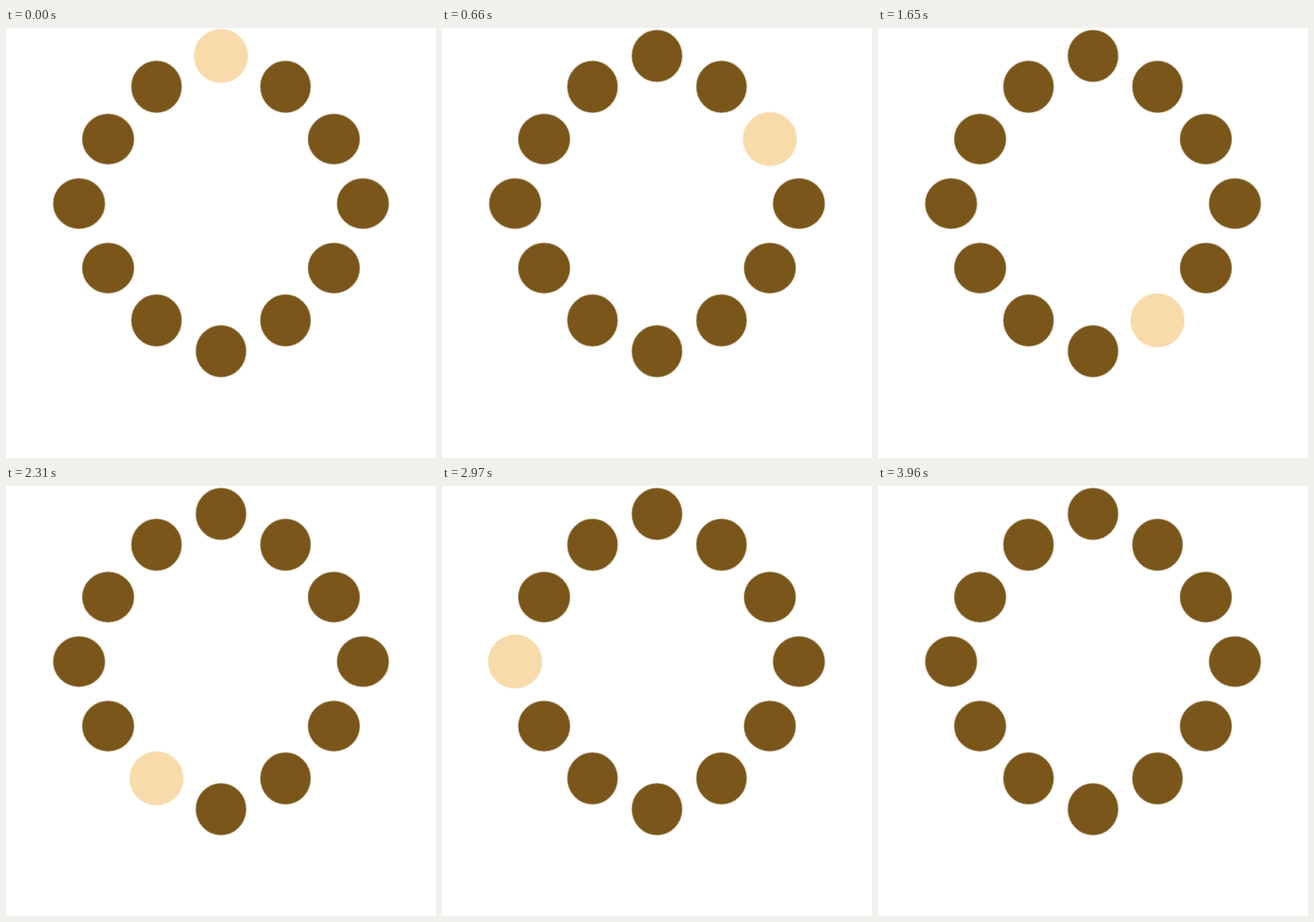
An HTML page for the animation above (4960 ms loop, 600 by 600 pixels).

```html
<!DOCTYPE html>
<html lang="en">
<head>
<meta charset="utf-8">
<title>Dot spinner</title>
<style>
  html, body { margin: 0; width: 100%; height: 100%; overflow: hidden; background: #fff; }
  svg { display: block; width: 100%; height: 100%; }
  ellipse { stroke-width: 2; stroke-opacity: .5; }
</style>
</head>
<body>
<svg id="stage" viewBox="0 0 600 600"></svg>
<script>
const STEP = 330, LOOP = 4960, COUNT = 12;
const BROWN = '#7a561b', CREAM = '#f8dbab';
const CENTRE = { x: 300, y: 245 };

// Offsets along one quarter of the ring, mirrored into the other three
const QUARTER = [[0, 206], [90, 163], [157.5, 90], [198, 0]];

function ringPoint(i) {
  const half = Math.min(i, COUNT - i);
  const [dx, dy] = QUARTER[Math.min(half, COUNT / 2 - half)];
  return {
    cx: CENTRE.x + (i > COUNT / 2 ? -dx : dx),
    cy: CENTRE.y + (half > COUNT / 4 ? dy : -dy)
  };
}

function setAttrs(node, attrs) {
  for (const name in attrs) node.setAttribute(name, attrs[name]);
}

const stage = document.getElementById('stage');
const dots = Array.from({ length: COUNT }, (_, i) => {
  const dot = document.createElementNS('http://www.w3.org/2000/svg', 'ellipse');
  setAttrs(dot, ringPoint(i));
  return stage.appendChild(dot);
});

function draw(time) {
  const active = Math.floor((time % LOOP) / STEP);
  dots.forEach((dot, i) => {
    const on = i === active;
    const color = on ? CREAM : BROWN;
    // Resting dots near the top and bottom are slightly tall, the others slightly wide
    const stretch = on ? 0 : (i + 1) % 6 < 3 ? 0.5 : -0.5;
    const r = on ? 37.2 : 35.2;
    setAttrs(dot, { rx: r - stretch, ry: r + stretch, fill: color, stroke: color });
  });
}

const start = performance.now();

function tick() {
  draw(performance.now() - start);
  requestAnimationFrame(tick);
}

tick();
</script>
</body>
</html>
```
